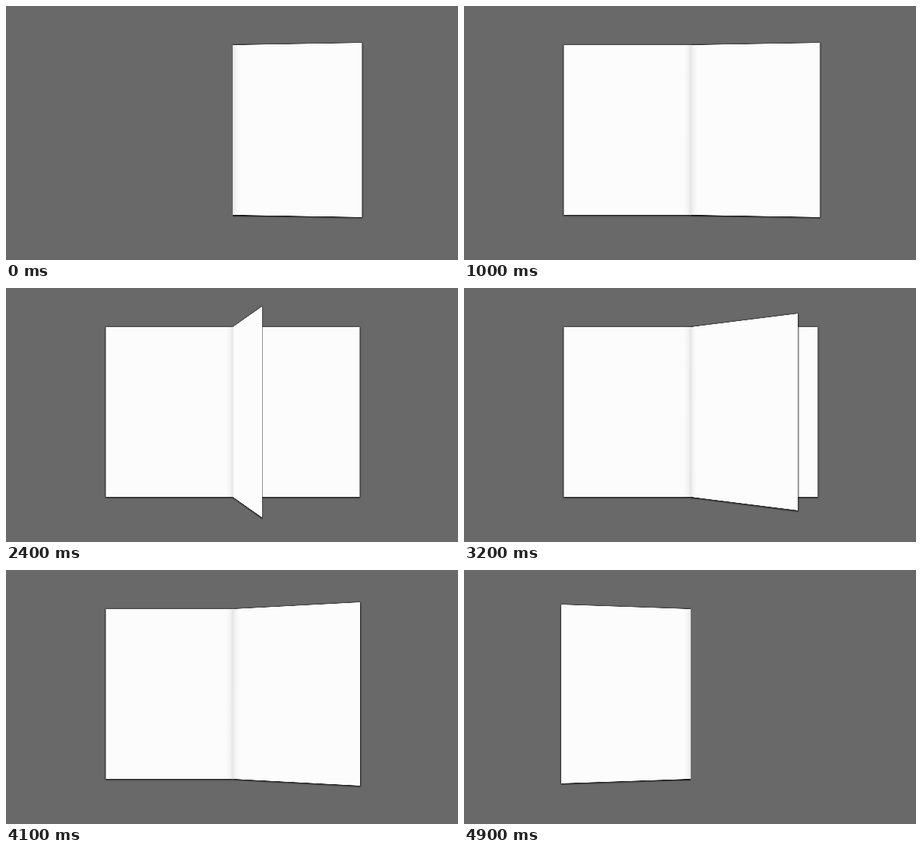
Write an HTML page that moves like this. It is 600 px wide and 338 px high and loops after 5 s.

```html
<!DOCTYPE html>
<html lang="en">
<head>
<meta charset="utf-8">
<title>Turning pages</title>
<style>
  html, body {
    margin: 0;
    width: 100%;
    height: 100%;
    overflow: hidden;
    background: #696969;
  }
  /* Zero-sized box on the middle of the spine, drawn at half scale */
  .book {
    position: absolute;
    left: 0;
    top: 0;
    width: 0;
    height: 0;
    perspective: 1685px;
    transform: translate(301px, 165px) scale(.5);
  }
  .leaf {
    position: absolute;
    left: 0;
    top: -226px;
    width: 337px;
    height: 452px;
    transform-origin: 0 50%;
    background: linear-gradient(90deg, rgba(0, 0, 0, .09), rgba(0, 0, 0, .03) 8px, transparent 20px) #fcfcfc;
    box-shadow: 0 1px 4px .6px #000;
    clip-path: inset(-12px -12px -12px 0);
  }
  #left { transform: rotateY(-180deg); }
</style>
</head>
<body>
<div class="book">
  <div class="leaf" id="left"></div>
  <div class="leaf" id="right"></div>
  <div class="leaf" id="turning"></div>
</div>
<script>
  const [left, right, turning] = document.querySelectorAll('.leaf');
  const LEAVES = 5, STEPS = 25;   // each leaf turns in 25 steps, one second
  const show = (leaf, on) => { leaf.style.visibility = on ? 'visible' : 'hidden'; };

  function draw(now) {
    const tick = Math.floor((now % (LEAVES * 1000)) / 100);
    const turn = Math.floor(tick / 10);
    const step = Math.floor(tick * 2.5) % STEPS + 1;
    show(left, turn > 0);
    show(right, turn < LEAVES - 1);
    turning.style.transform = `rotateY(${-180 * step / STEPS}deg)`;
  }

  let start;
  function frame(now) {
    start ??= now;
    draw(now - start);
    requestAnimationFrame(frame);
  }
  draw(0);
  requestAnimationFrame(frame);
</script>
</body>
</html>
```
